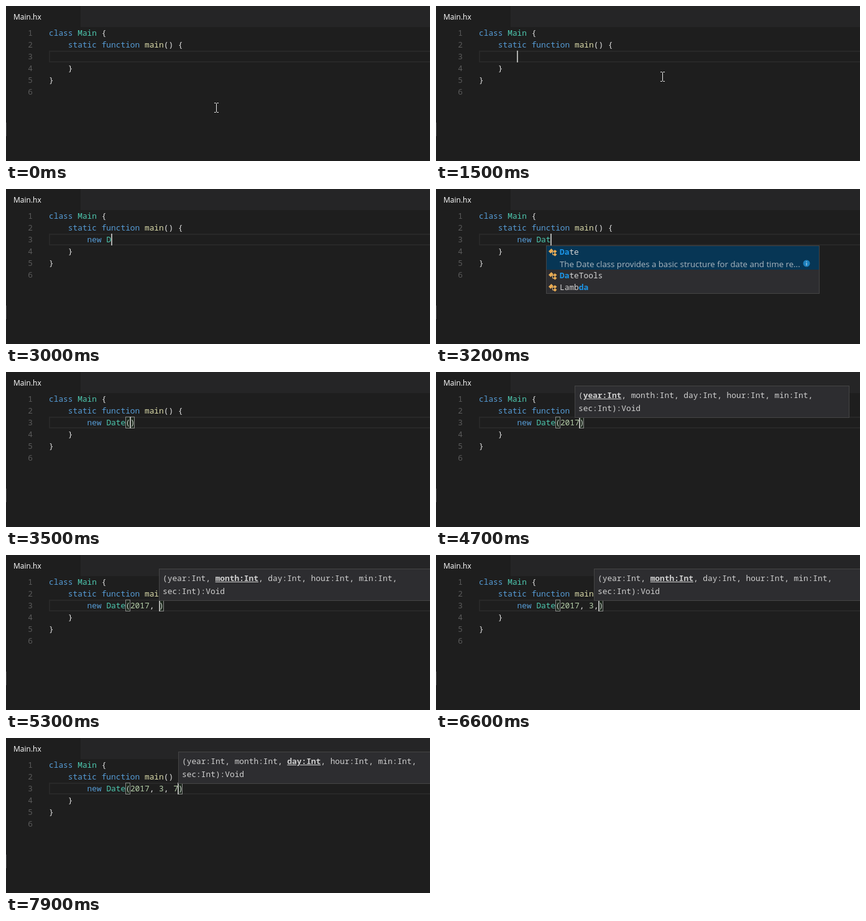
These frames come from a looping animation (682x250 px, 8000 ms). An HTML page:

```html
<!DOCTYPE html>
<html lang="en">
<head>
<meta charset="utf-8">
<title>Code completion</title>
<style>
html, body { margin: 0; width: 100%; height: 100%; overflow: hidden; background: #1e1e1e; }
#stage { position: relative; width: 682px; height: 250px; overflow: hidden; background: #1e1e1e; color: #e2e2e2;
  font: 12.833px/19px "Noto Sans Mono", "DejaVu Sans Mono", monospace; font-variant-ligatures: none; }
#stage div, #stage svg { position: absolute; box-sizing: border-box; white-space: pre; }
.tabs { left: 0; top: 0; width: 682px; height: 34px; background: #252526; }
.tab { left: 0; top: 0; width: 120px; height: 34px; padding: 1px 0 0 12px; background: #1e1e1e; color: #fff;
  font: 500 12px/34px "Open Sans", "Noto Sans", sans-serif; }
.edge { left: 0; top: 188px; width: 1px; height: 22px; background: #4a4a4c; }
#current { left: 69px; width: 640px; height: 19px; border: 2px solid #282828; }
#numbers { left: 20px; top: 34px; width: 23px; text-align: right; color: #5a5a5a; }
#code { left: 69px; top: 34px; }
.k { color: #569cd6; } .t { color: #4ec9b0; } .f { color: #dcdcaa; } .n { color: #b5cea8; }
.match { width: 8px; height: 19px; border: 1px solid #888; background: rgba(0, 100, 0, .1); }
#caret { width: 2px; height: 19px; background: #aeafad; }
#list { top: 91px; width: 440px; background: #2d2d30; border: 1px solid #454545; overflow: hidden; color: #d4d4d4; }
#list .row { left: 0; width: 438px; height: 19px; padding-left: 21px; }
#list .picked { height: 38px; background: #073655; }
#list b { color: #1c97ea; }
#list .row svg { left: 3px; top: 3px; }
#list .doc { left: 21px; top: 20px; color: #acb7c0; font: 13.22px/19px "Open Sans", "Noto Sans", sans-serif; }
#list .row .info { left: 411px; top: 21px; }
#hint { top: 22px; width: 442px; height: 52px; padding: 4px 5px; line-height: 21px; background: #2d2d30;
  border: 1px solid #454545; color: #d0d0d0; }
#hint b { text-decoration: underline; }
</style>
</head>
<body>
<div id="stage">
  <div class="tabs"></div>
  <div class="tab">Main.hx</div>
  <div class="edge"></div>
  <div id="current"></div>
  <div id="numbers">1
2
3
4
5
6</div>
  <div id="code"></div>
  <div class="match" id="open"></div>
  <div class="match" id="close"></div>
  <div id="caret"></div>
  <div id="list"></div>
  <div id="hint"></div>
  <svg id="mouse" width="7" height="16" fill="none" stroke="#e8e8e8">
    <path d="M0 .5H2.5L3.5 1.5L4.5 .5H7M3.5 1.5V14.5M0 15.5H2.5L3.5 14.5L4.5 15.5H7"/>
  </svg>
</div>
<script>
const LOOP = 8000, CHAR = 7.7, LEFT = 69, TOP = 34, LINE = 19;
const $ = id => document.getElementById(id);
const colX = col => Math.floor(LEFT + col * CHAR);
const rowY = row => TOP + (row - 1) * LINE;
const span = (cls, s) => `<span class="${cls}">${s}</span>`;

const typing = [
  [0, ''], [2600, 'n'], [2700, 'new'], [2800, 'new '], [3000, 'new D'], [3100, 'new Da'],
  [3200, 'new Dat'], [3300, 'new Date'], [3500, 'new Date('], [4200, 'new Date(2'],
  [4300, 'new Date(20'], [4500, 'new Date(201'], [4700, 'new Date(2017'],
  [5100, 'new Date(2017,'], [5200, 'new Date(2017, '], [5700, 'new Date(2017, 3'],
  [6600, 'new Date(2017, 3,'], [6700, 'new Date(2017, 3, '], [7800, 'new Date(2017, 3, 7']
];
// time, left edge, active parameter
const hints = [
  [3600, 200, 0], [4300, 213, 0], [4400, 215, 0], [4600, 223, 0], [4800, 231, 0],
  [5200, 239, 1], [5300, 246, 1], [5800, 254, 1], [6700, 262, 2], [6800, 269, 2], [7900, 277, 2]
];
// time, left edge, filter, entries
const lists = [
  [3100, 169, 'D', ['Date', 'DateTools', 'Dynamic', 'Lambda', 'Std', 'StdTypes', 'Void', 'IntIterator']],
  [3200, 177, 'Da', ['Date', 'DateTools', 'Lambda']],
  [3300, 192, 'Date', ['Date', 'DateTools']],
  [3500]
];
const pointer = [
  [0, 338, 164], [100, 328, 148], [200, 309, 121], [300, 293, 101], [400, 285, 93],
  [800, 290, 86], [900, 301, 72], [1000, 308, 63], [1300, 318, 72], [1400, 338, 90],
  [1500, 364, 114], [1600, 392, 138], [1700, 414, 156], [1800, 427, 167], [1900, 431, 170], [2000]
];
const blinks = [[0, 1100], [1800, 2300], [4000, 4200], [6300, 6600], [7300, 7800]];
const params = ['year:Int', 'month:Int', 'day:Int', 'hour:Int', 'min:Int', 'sec:Int'];

const at = (steps, t) => steps.filter(s => s[0] <= t).pop();
const show = (el, on) => { el.style.display = on ? 'block' : 'none'; };
const place = (el, x, y) => { el.style.left = x + 'px'; el.style.top = y + 'px'; };

function paint(s) {
  return s.replace(/new|D\w*|\d+/g, w =>
    span(w === 'new' ? 'k' : /\d/.test(w) ? 'n' : 't', w));
}

function codeHtml(typed) {
  const tail = typed.includes('(') ? ')' : '';
  return [
    `${span('k', 'class')} ${span('t', 'Main')} {`,
    `    ${span('k', 'static function')} ${span('f', 'main')}() {`,
    '        ' + paint(typed) + tail,
    '    }',
    '}'
  ].join('\n');
}

const icon = `<svg width="14" height="14"><path fill="none" stroke="#d9b27a" d="M5 6.5H9M6.5 6.5V11H9"/>
<path fill="#e8ab53" d="M0 5.5L4.5 1L8 4.5L3.5 9ZM10 3L13.5 5.5L10.5 8.5L7.5 6ZM10 8L13.5 10.5L10.5 13.5L7.5 11Z"/></svg>`;
const doc = `<div class="doc">The Date class provides a basic structure for date and time re...</div>
<svg class="info" width="14" height="14"><circle cx="7" cy="7" r="5.5" fill="#1c80bd"/>
<path stroke="#a9cbe0" stroke-width="1.3" d="M7 3.5V5M7 6V10.5"/></svg>`;

function listHtml(filter, items) {
  const re = new RegExp(filter, 'i');
  return items.map((s, i) =>
    `<div class="row${i ? '' : ' picked'}" style="top:${i ? (i + 1) * LINE : 0}px">` +
    icon + s.replace(re, '<b>$&</b>') + (i ? '' : doc) + '</div>').join('');
}

function hintHtml(active) {
  const p = params.map((s, i) => i === active ? `<b>${s}</b>` : s);
  return `(${p.slice(0, 5).join(', ')},\n${p[5]}):Void`;
}

function draw(t) {
  const typed = at(typing, t)[1];
  const upper = t >= 1100 && t < 1300;
  const paren = typed.indexOf('(');
  const caretX = upper ? colX(28) : colX(8 + typed.length);

  $('code').innerHTML = codeHtml(typed);
  $('current').style.top = rowY(upper ? 2 : 3) + 'px';
  place($('caret'), caretX, rowY(upper ? 2 : 3));
  show($('caret'), !blinks.some(([a, b]) => t >= a && t < b));

  show($('open'), upper || paren >= 0);
  show($('close'), upper || paren >= 0);
  if (upper) {
    place($('open'), colX(27), rowY(2));
    place($('close'), colX(4), rowY(4));
  } else {
    place($('open'), colX(8 + paren), rowY(3));
    place($('close'), caretX, rowY(3));
  }

  const list = at(lists, t);
  const listed = list && list.length > 1;
  show($('list'), listed);
  if (listed) {
    $('list').style.left = list[1] + 'px';
    $('list').style.height = (list[3].length + 1) * LINE + 2 + 'px';
    $('list').innerHTML = listHtml(list[2], list[3]);
  }

  const hint = at(hints, t);
  show($('hint'), hint);
  if (hint) {
    $('hint').style.left = hint[1] + 'px';
    $('hint').innerHTML = hintHtml(hint[2]);
  }

  const p = at(pointer, t);
  show($('mouse'), p.length > 1);
  if (p.length > 1) place($('mouse'), p[1] - 3, p[2] - 8);
}

const start = performance.now();
let last = -1;
function tick() {
  const t = Math.floor((performance.now() - start) % LOOP / 100) * 100;
  if (t !== last) draw(last = t);
  requestAnimationFrame(tick);
}
tick();
</script>
</body>
</html>
```
